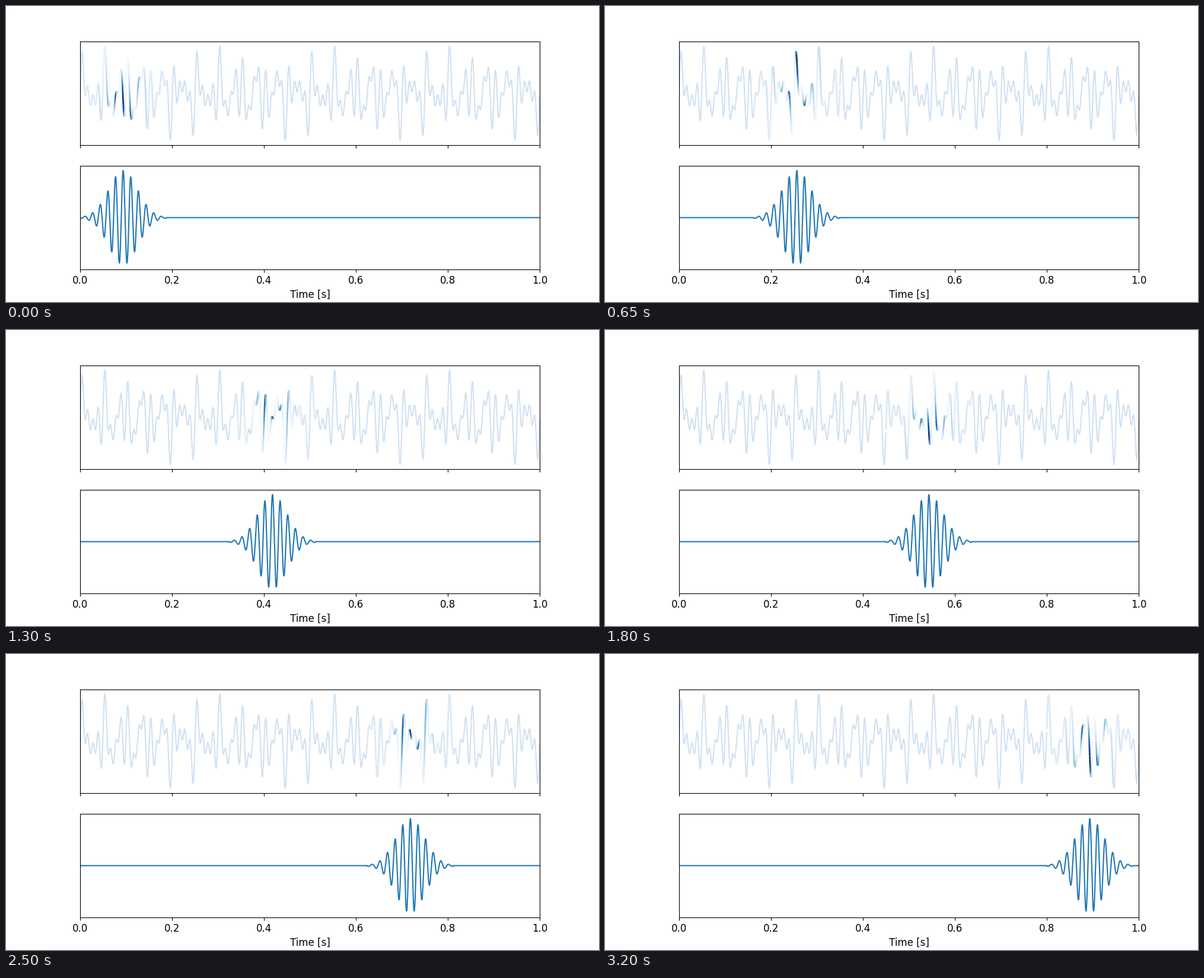
A matplotlib script for the animation above (3250 ms loop, 1000 by 500 pixels).

```python
import numpy as np
import matplotlib.pyplot as plt
from matplotlib.animation import FuncAnimation
from matplotlib.collections import LineCollection

RATE = 4000      # samples per second
WIDTH = 750      # samples in the wavelet
HOP = 50         # samples moved per frame
FRAMES = 65
SHARPNESS = 1.75

plt.rcParams.update({"font.family": "DejaVu Sans", "font.size": 12})

t = np.arange(RATE) / RATE
signal = sum(np.sin(2 * np.pi * f * t) for f in (24, 40, 60, 80))
points = np.column_stack([t, signal])
segments = np.stack([points[:-1], points[1:]], axis=1)

# 60 Hz wavelet, cut at three standard deviations
x = (np.arange(WIDTH) - (WIDTH - 1) / 2) / RATE
sigma = WIDTH / RATE / 6
wavelet = np.exp(-0.5 * (x / sigma) ** 2) * np.cos(2 * np.pi * 60 * x)

# exponential shading lets only the crests stand out
weight = np.exp(SHARPNESS * wavelet)
shades = plt.cm.Blues((weight - weight.min()) / np.ptp(weight))
pale = plt.cm.Blues(0.2)

fig, (top, bottom) = plt.subplots(2, 1, sharex=True, figsize=(10, 5), dpi=100)
before, = top.plot([], [], color=pale)
after, = top.plot([], [], color=pale)
window = LineCollection([], linewidths=2)
top.add_collection(window)
pulse, = bottom.plot([], [], color="C0")

peak = np.abs(signal).max()
top.set(xlim=(0, 1), ylim=(-1.1 * peak, 1.1 * peak), yticks=[])
bottom.set(ylim=(-1.1, 1.1), yticks=[], xlabel="Time [s]")


def draw(i):
    start = i * HOP
    end = start + WIDTH
    before.set_data(t[:start], signal[:start])
    after.set_data(t[end:], signal[end:])
    window.set_segments(segments[start:end - 1])
    window.set_color(shades[:-1])
    y = np.zeros(RATE)
    y[start:end] = wavelet
    pulse.set_data(t, y)
    return before, after, window, pulse


anim = FuncAnimation(fig, draw, frames=FRAMES, interval=50, repeat=True)
plt.show()
```
